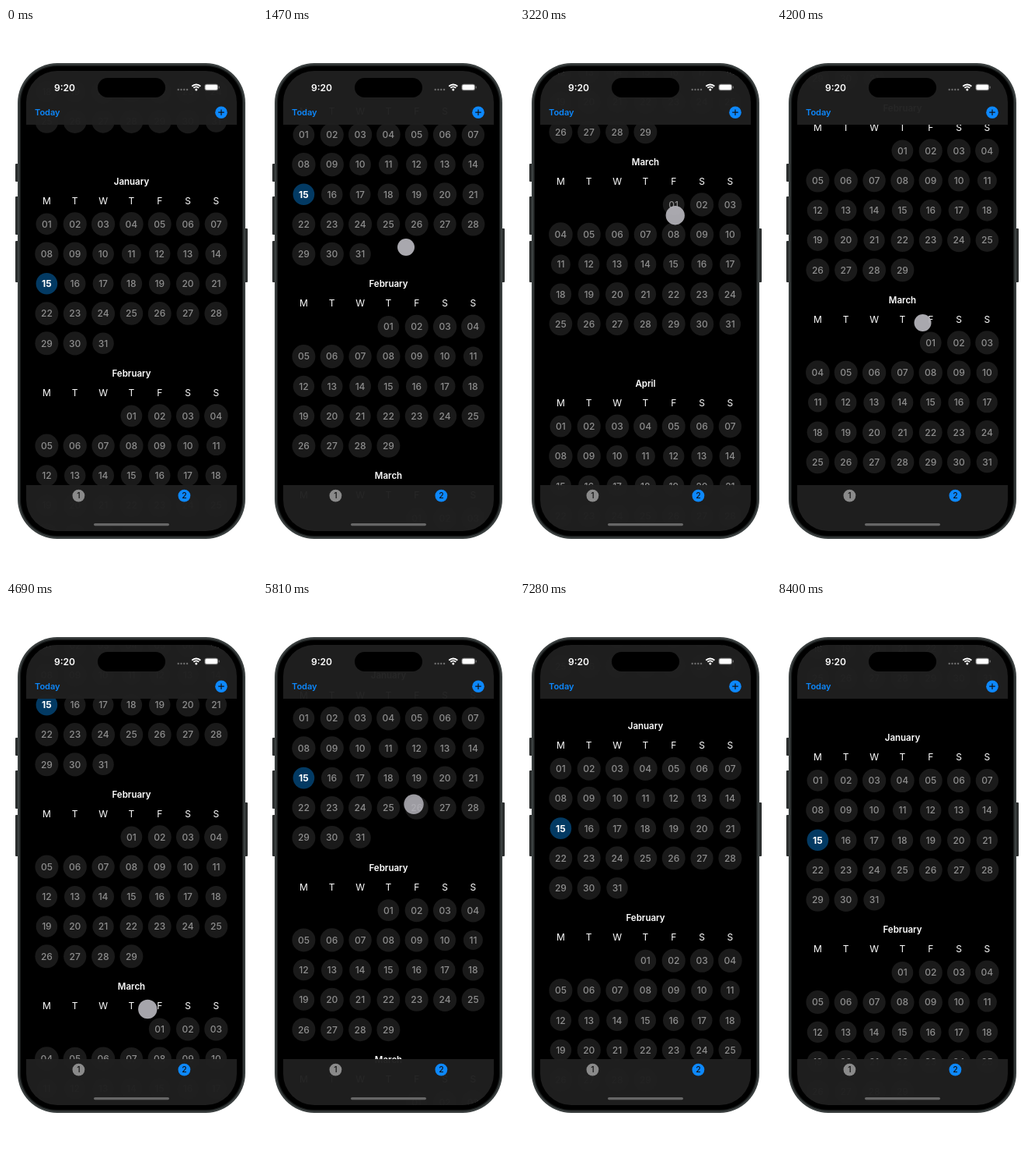
Recreate the animation shown at these times as an HTML page with a canvas. Size 323 by 700 pixels, loop 8820 ms.

```html
<!DOCTYPE html>
<html lang="en">
<head>
<meta charset="utf-8">
<title>Calendar scroll</title>
<style>
html, body { margin: 0; width: 100%; height: 100%; overflow: hidden; background: #fff; }
canvas { display: block; width: 323px; height: 700px; }
</style>
</head>
<body>
<canvas id="stage" width="323" height="700"></canvas>
<script>
const ctx = document.getElementById('stage').getContext('2d');
const LOOP = 8820, STEP = 70, REST = 8400, FADE = 140;
const ROW = 38.25, HEAD = 54.8;
const BLUE = '#0d88fd', GRAY = '#8a8a8a', BAR = 'rgba(31,31,31,.97)';

// Turning points of the scroll: [time, y of the January title]
const SCROLL = [[0, 196.5], [1470, 82], [2450, -81], [3220, -320.5], [3465, -340],
  [4690, 0.5], [5390, 64], [6650, 140], [8260, 174]];

// Touches ride on the content at a distance; drift and slip are their own motion
const TOUCHES = [
  { start: 350, end: 1700, x: 184, distance: 199 },
  { start: 2380, end: 3340, x: 191, drift: 10, distance: 580, slip: -22 },
  { start: 3500, end: 4809, x: 195, drift: -14, distance: 521.5 },
  { start: 5700, end: 6790, x: 194, distance: 165 },
];

const secant = i => (SCROLL[i + 1][1] - SCROLL[i][1]) / (SCROLL[i + 1][0] - SCROLL[i][0]);

function slope(i) {
  if (i === 0 || i === SCROLL.length - 1) return 0;
  const a = secant(i - 1), b = secant(i);
  return a * b > 0 ? 2 * a * b / (a + b) : 0;
}

// Monotone cubic interpolation
function scrollAt(time) {
  const t = Math.min(time, SCROLL.at(-1)[0]);
  let i = 0;
  while (i < SCROLL.length - 2 && t >= SCROLL[i + 1][0]) i++;
  const [t0, y0] = SCROLL[i], [t1, y1] = SCROLL[i + 1];
  const h = t1 - t0, p = (t - t0) / h, q = 1 - p;
  return y0 * (1 + 2 * p) * q * q + y1 * (3 - 2 * p) * p * p
    + h * p * q * (slope(i) * q - slope(i + 1) * p);
}

function text(str, x, y, size, weight, color, align = 'center') {
  ctx.font = `${weight} ${size}px Inter, sans-serif`;
  ctx.textAlign = align;
  ctx.fillStyle = color;
  ctx.fillText(str, x, y + size * 0.364);
}

function disc(x, y, r, color) {
  ctx.fillStyle = color;
  ctx.beginPath();
  ctx.arc(x, y, r, 0, 7);
  ctx.fill();
}

function box(x, y, w, h, r, color) {
  ctx.fillStyle = color;
  ctx.beginPath();
  ctx.roundRect(x, y, w, h, r);
  ctx.fill();
}

const columnX = i => 52.4 + 36.33 * i;

function drawDay(day, x, y, today) {
  const label = String(day).padStart(2, '0');
  const weight = today ? 700 : 500;
  ctx.font = `${weight} 12px Inter, sans-serif`;
  disc(x, y, ctx.measureText(label).width / 2 + 7.5, today ? '#033a63' : '#1a1a1a');
  text(label, x, y, 12, weight, today ? '#fff' : '#8e8e8e');
}

function drawCalendar(january) {
  let y = january - HEAD - 6 * ROW;
  for (let m = -1; y < 610; m++) {
    const first = new Date(2024, m, 1);
    const lead = (first.getDay() + 6) % 7;
    const days = new Date(2024, m + 1, 0).getDate();
    text(first.toLocaleString('en', { month: 'long' }), 161.5, y, 11.5, 600, '#fff');
    [...'MTWTFSS'].forEach((d, i) => text(d, columnX(i), y + 25, 12, 400, '#fff'));
    for (let d = 1; d <= days; d++) {
      const cell = lead + d - 1;
      drawDay(d, columnX(cell % 7), y + HEAD + ROW * Math.floor(cell / 7), m === 0 && d === 15);
    }
    y += HEAD + ROW * (Math.floor((lead + days) / 7) + 1);
  }
}

function drawPhone() {
  const button = (x, y, h) => box(x, y, 5, h, 1, '#2b2e2e');
  button(12, 174, 23);
  button(12, 216, 49);
  button(12, 273, 53);
  button(306, 257, 69);
  const shell = (inset, color) =>
    box(15 + inset, 45 + inset, 293 - 2 * inset, 610 - 2 * inset, 51 - inset, color);
  shell(0, '#3a3f3f');
  shell(2.5, '#1b1e1e');
  shell(4, '#000');
}

function drawStatus() {
  box(118, 64, 87, 25, 12.5, '#000');
  text('9:20', 75.5, 76.2, 12, 600, '#fff');
  for (let i = 0; i < 4; i++) disc(221.7 + i * 3.8, 79, 1.2, '#6b6b6b');
  ctx.strokeStyle = '#fff';
  ctx.lineWidth = 1.9;
  for (const r of [7.8, 4.8]) {
    ctx.beginPath();
    ctx.arc(244.8, 80.3, r, -Math.PI * 0.75, -Math.PI * 0.25);
    ctx.stroke();
  }
  disc(244.8, 79, 1.5, '#fff');
  box(255.5, 71.7, 17.5, 8.6, 2.8, '#777');
  box(256.5, 72.7, 15.5, 6.6, 1.8, '#fff');
  box(273.6, 74.5, 1.2, 3, 0.6, '#777');
}

function drawTab(label, x, color) {
  disc(x, 599.6, 7.9, color);
  text(label, x, 599.6, 10.5, 500, '#111');
}

function drawBars() {
  box(26, 55, 271, 69, 0, BAR);
  box(26, 586, 271, 60, 0, BAR);
  drawStatus();
  text('Today', 37, 108.3, 11, 600, BLUE, 'left');
  disc(277, 108.2, 7.8, BLUE);
  box(273.2, 107.6, 7.6, 1.2, 0, '#111');
  box(276.4, 104.4, 1.2, 7.6, 0, '#111');
  drawTab('1', 93.4, GRAY);
  drawTab('2', 229.4, BLUE);
  box(113, 635, 97, 3.2, 1.6, '#666');
}

function drawTouches(t, january) {
  for (const { start, end, x, drift = 0, distance, slip = 0 } of TOUCHES) {
    if (t <= start || t >= end) continue;
    const p = (t - start) / (end - start);
    const shown = Math.min(1, (t - start) / FADE, (end - t) / FADE);
    ctx.globalAlpha = Math.min(1, shown * 1.15) * 0.95;
    disc(x + drift * p, january + distance + slip * p, 19 - 8 * shown, '#b3b2b8');
    ctx.globalAlpha = 1;
  }
}

function frame(now) {
  const t = Math.min(REST, Math.floor(now % LOOP / STEP) * STEP);
  const january = scrollAt(t);
  ctx.clearRect(0, 0, 323, 700);
  drawPhone();
  ctx.save();
  ctx.beginPath();
  ctx.roundRect(26, 55, 271, 590, 40);
  ctx.clip();
  drawCalendar(january);
  drawBars();
  drawTouches(t, january);
  ctx.restore();
  requestAnimationFrame(frame);
}
requestAnimationFrame(frame);
</script>
</body>
</html>
```
